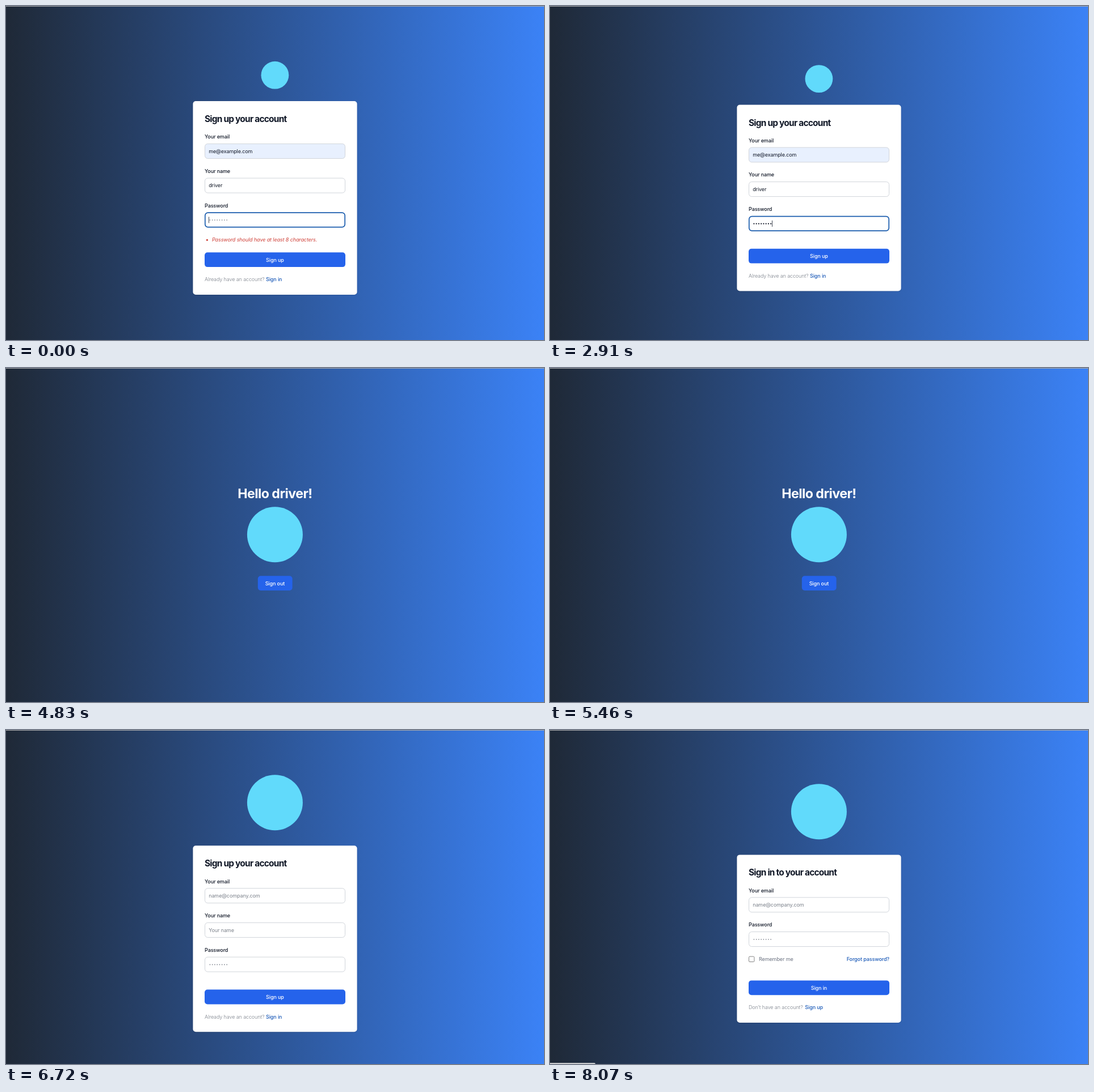
An HTML page with a canvas for the animation above (8.1 s loop, 948 by 590 pixels).

```html
<!DOCTYPE html>
<html lang="en">
<head>
<meta charset="utf-8">
<title>Sign up</title>
<style>
html, body { margin: 0; width: 948px; height: 590px; overflow: hidden; background: #1f2937; }
canvas { display: block; }
</style>
</head>
<body>
<canvas id="stage" width="948" height="590"></canvas>
<script>
const ctx = document.getElementById('stage').getContext('2d');
const LOOP = 8100;
const INK = '#111827', MUTED = '#7b808a', LINK = '#1c5bb8';
const BLUE = '#2563eb', DARK_BLUE = '#1d4ed8', CYAN = '#61dafb';
const LEFT = 350, FIELD_W = 248, MID = 473.9, SIZE = 9.03;
const USER = 'driver', EMAIL = 'me@example.com';
const KEYS = [1140, 1390, 1610, 1800, 2000, 2200, 2400, 2580];
const CLEARED = KEYS[7], SUBMITTED = 3660, HELLO = 4170;
const SIGNED_OUT = 6420, SIGN_IN = 7770;

const within = (t, from, to) => t >= from && t < to;

// y is the middle of the capital letters
function text(str, x, y, color, { weight = 400, size = SIZE, gap = -0.013, align = 'left', style = '' } = {}) {
  ctx.font = `${style} ${weight} ${size}px Inter, sans-serif`;
  ctx.letterSpacing = gap * size + 'px';
  ctx.textAlign = align;
  ctx.fillStyle = color;
  ctx.fillText(str, x, y + size * 0.36);
  return ctx.measureText(str).width;
}

function box(x, y, w, h, r, fill, stroke, line = 1) {
  ctx.beginPath();
  ctx.roundRect(x, y, w, h, r);
  if (fill) {
    ctx.fillStyle = fill;
    ctx.fill();
  }
  if (stroke) {
    ctx.strokeStyle = stroke;
    ctx.lineWidth = line;
    ctx.stroke();
  }
}

function disc(x, y, r, color) {
  ctx.beginPath();
  ctx.arc(x, y, r, 0, 7);
  ctx.fillStyle = color;
  ctx.fill();
}

function background() {
  const sky = ctx.createLinearGradient(0, 0, 948, 0);
  sky.addColorStop(0, '#1f2937');
  sky.addColorStop(1, '#3b82f6');
  ctx.fillStyle = sky;
  ctx.fillRect(0, 0, 948, 590);
  ctx.fillStyle = '#a9aaac';
  ctx.fillRect(0, 0, 948, 1);
}

function card(top, height, title) {
  ctx.save();
  ctx.shadowColor = 'rgba(0,0,0,.15)';
  ctx.shadowBlur = 2;
  ctx.shadowOffsetY = 0.6;
  box(329.4, top, 289.2, height, 5, '#fff');
  ctx.restore();
  text(title, LEFT, top + 31.5, INK, { weight: 700, size: 15.48, gap: -0.051 });
}

function field(label, y, { value, hint, fill = '#fff', focus } = {}) {
  text(label, LEFT, y, INK, { weight: 500 });
  if (focus) box(LEFT + 0.8, y + 12.8, FIELD_W - 1.6, 25.4, 5, fill, '#1a5cad', 1.7);
  else box(LEFT + 0.5, y + 12.4, FIELD_W - 1, 26, 5, fill, '#d1d5db');
  if (value || hint) text(value || hint, 357.2, y + 25.4, value ? INK : MUTED);
}

function password(y, count, focus, caret) {
  field('Password', y, { focus });
  for (let i = 0; i < (count || 8); i++) {
    disc(359.4 + i * 4.25, y + 25.7, count ? 1.15 : 0.85, count ? INK : MUTED);
  }
  if (caret) {
    ctx.fillStyle = INK;
    ctx.fillRect(357.2 + count * 4.25, y + 20, 0.8, 11);
  }
}

function button(label, y, hover, ring) {
  if (ring) box(LEFT - 2.6, y - 2.6, FIELD_W + 5.2, 31, 7, '#93c5fd');
  box(LEFT, y, FIELD_W, 25.8, 5, hover ? DARK_BLUE : BLUE);
  text(label, MID, y + 13, '#fff', { weight: 500, align: 'center' });
}

function footer(question, link, x, y, underline) {
  text(question, LEFT, y, MUTED, { weight: 300 });
  const w = text(link, x, y, LINK, { weight: 500 });
  if (underline) ctx.fillRect(x, y + 4.3, w, 0.7);
}

function signUp(top, s) {
  const extra = s.error ? 13 : 0;
  card(top, 329 + extra, 'Sign up your account');
  field('Your email', top + 63, s.filled
    ? { value: EMAIL, fill: '#e8f0fe' }
    : { hint: 'name@company.com' });
  field('Your name', top + 123.7, s.filled ? { value: USER } : { hint: 'Your name' });
  password(top + 184.4, s.count, s.focus, s.caret);
  if (s.error) {
    disc(354.4, top + 245.3, 1.6, '#cf4038');
    text('Password should have at least 8 characters.', 363, top + 245, '#cf4038', { style: 'italic' });
  }
  button('Sign up', top + 254.3 + extra, s.hover, s.ring);
  footer('Already have an account?', 'Sign in', 458, top + 302 + extra, s.underline);
}

function signIn(top) {
  card(top, 296.6, 'Sign in to your account');
  field('Your email', top + 63, { hint: 'name@company.com' });
  password(top + 123.7, 0);
  box(350.5, top + 179.7, 9.4, 9.4, 1.5, '#fff', '#767676', 0.9);
  text('Remember me', 368, top + 184.5, '#6b7280');
  text('Forgot password?', 598, top + 184.5, LINK, { weight: 500, align: 'right' });
  button('Sign in', top + 222);
  footer('Don’t have an account?', 'Sign up', 449.3, top + 269.6);
}

function hello(t) {
  text(`Hello ${USER}!`, MID, 221.6, '#fff', { weight: 700, size: 23.2, gap: -0.023, align: 'center' });
  disc(MID, 294.2, 49, CYAN);
  box(443.8, 367.2, 60.8, 25.8, 5, t > 5600 ? DARK_BLUE : BLUE);
  text('Sign out', MID, 380.3, '#fff', { weight: 500, align: 'center' });
}

function draw(t) {
  background();
  if (t < HELLO) {
    const error = t < CLEARED, focus = t < SUBMITTED;
    const count = KEYS.filter(k => t >= k).length;
    const typing = within(t, KEYS[0], CLEARED + 500);
    const blink = Math.floor((t + 200) / 500) % 2 === 0;
    disc(MID, error ? 122.2 : 128.6, 24.4, CYAN);
    signUp(error ? 168 : 174.5, {
      filled: true, error, focus, count,
      caret: focus && (typing || blink),
      hover: t >= 3270,
      ring: !focus
    });
  } else if (t < SIGNED_OUT) {
    hello(t);
  } else if (t < SIGN_IN) {
    disc(MID, 128.2, 49, CYAN);
    signUp(204.3, { count: 0, hover: within(t, 7050, 7290), underline: t >= 7440 });
  } else {
    disc(MID, 144.3, 49, CYAN);
    signIn(220.4);
  }
  if (t >= 7650) box(0, 588, 80, 3, [0, 2, 0, 0], '#c9cbce');
}

function tick(now) {
  draw(now % LOOP);
  requestAnimationFrame(tick);
}
draw(0);
requestAnimationFrame(tick);
</script>
</body>
</html>
```
